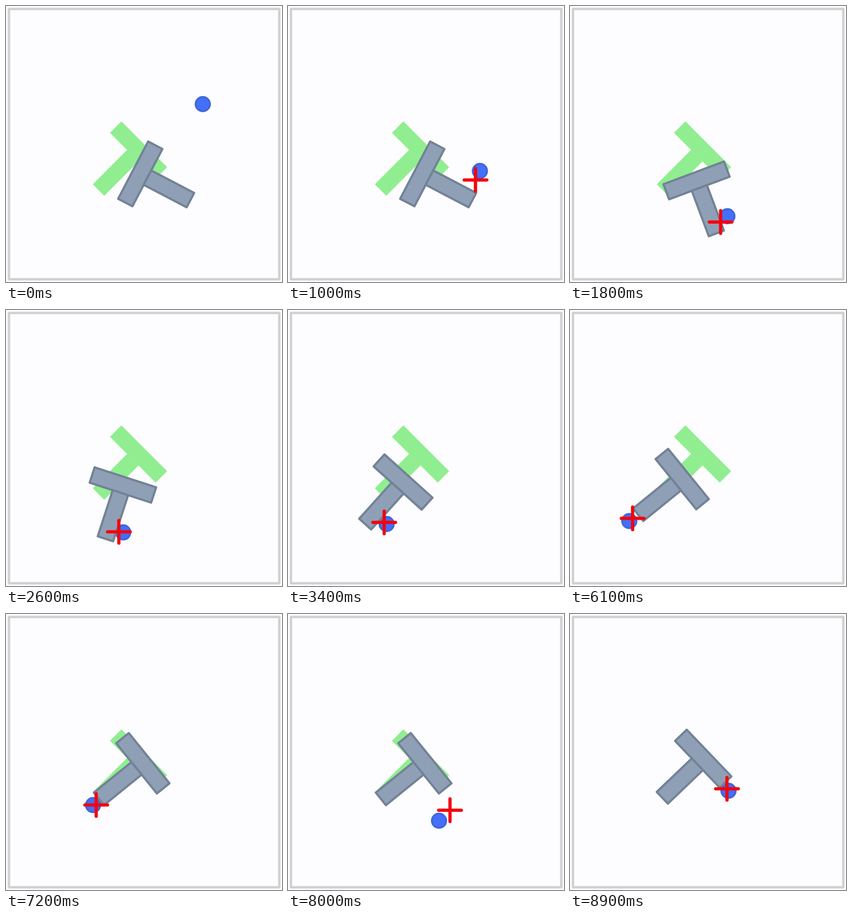
An HTML page with a canvas for the animation above (9 s loop, 512x512 px).

```html
<!DOCTYPE html>
<html lang="en">
<head>
<meta charset="utf-8">
<title>Push the T</title>
<style>
html, body { margin: 0; width: 100%; height: 100%; overflow: hidden; background: #fdfcfe; }
canvas { display: block; width: 512px; height: 512px; }
</style>
</head>
<body>
<canvas id="stage" width="512" height="512"></canvas>
<script>
const ctx = document.getElementById('stage').getContext('2d');
const LOOP = 9000, STEP = 100;
const LEAD = .14; // seconds by which the cursor runs ahead of the ball

// Waypoints of the ball: seconds, x, y
const route = [
  [0, 365, 182], [.4, 374, 222], [1, 356, 306], [1.8, 292, 390], [2.4, 230, 413],
  [3.4, 183, 397], [4, 178, 380], [4.7, 181, 379], [5, 186, 384], [5.4, 157, 418],
  [5.85, 102, 403], [6.1, 110, 391.5], [7.2, 161.5, 354.5], [7.5, 168, 388],
  [7.8, 246, 404], [8.2, 303, 358], [8.5, 302, 339], [8.9, 294, 328]
];

// Poses of the block: x, y, degrees; it rests between pushes
const low = [219.8, 304.2, 51], near = [265.5, 267.5, 51];
const pushes = [
  [1.2, 235.8, 304.5, -62.4], [1.8, 229.5, 309.5, -20.5], [2.4, 221, 311, 12],
  [3.4, 223.5, 308, 42], [4, ...low], [6.2, ...low], [7.2, ...near], [8.4, ...near],
  [8.9, 258, 258, 46.3]
];

const clamp = (v, lo, hi) => Math.min(hi, Math.max(lo, v));

// Index of the segment around t and the progress through it
function segment(keys, t) {
  const i = clamp(keys.findIndex(k => k[0] > t), 1, keys.length - 1);
  const j = t >= keys[keys.length - 1][0] ? keys.length - 1 : i;
  const h = keys[j][0] - keys[j - 1][0];
  return [j, clamp((t - keys[j - 1][0]) / h, 0, 1), h];
}

function linear(keys, t) {
  const [i, p] = segment(keys, t);
  return keys[i].slice(1).map((v, n) => v * p + keys[i - 1][n + 1] * (1 - p));
}

function slope(keys, i, n) {
  const a = keys[Math.max(i - 1, 0)], b = keys[Math.min(i + 1, keys.length - 1)];
  return (b[n] - a[n]) / (b[0] - a[0]);
}

// Smooth curve through the keys: position and velocity of value n
function spline(keys, t, n) {
  const [i, p, h] = segment(keys, t);
  const a = keys[i - 1][n], d = keys[i][n] - a;
  const u = slope(keys, i - 1, n) * h, v = slope(keys, i, n) * h;
  const c2 = 3 * d - 2 * u - v, c3 = u + v - 2 * d;
  return [a + p * (u + p * (c2 + p * c3)), (u + p * (2 * c2 + 3 * p * c3)) / h];
}

function tee([x, y, deg], fill, edge) {
  ctx.save();
  ctx.translate(x, y);
  ctx.rotate(deg * Math.PI / 180);
  ctx.fillStyle = fill;
  for (const r of [[-60, 0, 120, 30], [-15, 30, 30, 90]]) {
    ctx.fillRect(...r);
    if (!edge) continue;
    ctx.strokeStyle = edge;
    ctx.lineWidth = 4;
    ctx.strokeRect(...r);
  }
  ctx.restore();
}

function disc(x, y, r, color) {
  ctx.fillStyle = color;
  ctx.beginPath();
  ctx.arc(x, y, r, 0, 2 * Math.PI);
  ctx.fill();
}

function cross(x, y) {
  ctx.strokeStyle = '#f4040e';
  ctx.lineWidth = 6;
  ctx.beginPath();
  ctx.moveTo(x - 21, y);
  ctx.lineTo(x + 21, y);
  ctx.moveTo(x, y - 21);
  ctx.lineTo(x, y + 21);
  ctx.stroke();
}

function draw(t) {
  ctx.fillStyle = '#fdfcfe';
  ctx.fillRect(0, 0, 512, 512);
  ctx.strokeStyle = '#d2d0d3';
  ctx.lineWidth = 4.5;
  ctx.strokeRect(5.5, 5.5, 501.5, 501.5);
  tee([256.5, 256.5, 45], '#90ee90');
  const [x, vx] = spline(route, t, 1), [y, vy] = spline(route, t, 2);
  disc(x, y, 15, '#4066d8');
  disc(x, y, 11.5, '#446ffa');
  tee(linear(pushes, t), '#8fa0b6', '#738296');
  if (t > 0) cross(x + LEAD * vx, y + LEAD * vy);
}

ctx.lineCap = ctx.lineJoin = 'round';
const start = performance.now();
function tick() {
  const ms = (performance.now() - start) % LOOP;
  draw(Math.floor(ms / STEP) * STEP / 1000);
  requestAnimationFrame(tick);
}
tick();
</script>
</body>
</html>
```
